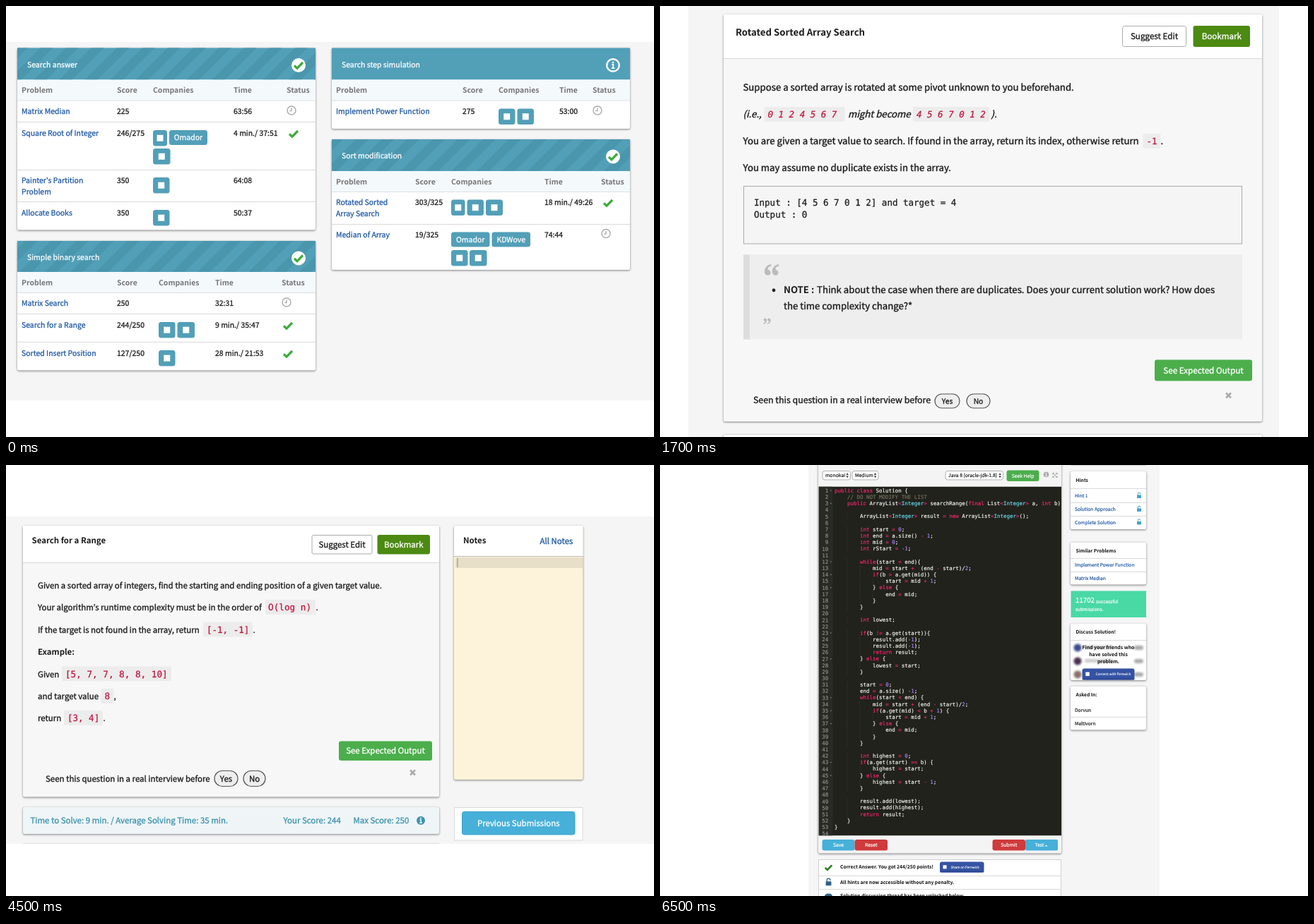
Recreate the animation shown at these times as an HTML page. Size 917 by 611 pixels, loop 8 s.

```html
<!DOCTYPE html>
<html lang="en">
<head>
<meta charset="utf-8">
<title>Practice problems</title>
<style>
html, body { margin: 0; width: 100%; height: 100%; overflow: hidden; background: #fff; }
#stage { position: relative; width: 917px; height: 611px; overflow: hidden; }
#strip { animation: cut 8s step-end infinite; }
#strip > svg { display: block; width: 917px; height: 611px; overflow: hidden; background: #fff; }
@keyframes cut {
  0% { transform: translateY(0); }
  6.25% { transform: translateY(-611px); }
  31.25% { transform: translateY(-1222px); }
  56.25% { transform: translateY(-1833px); }
  81.25%, 100% { transform: translateY(-2444px); }
}
text {
  font-family: "Noto Sans CJK JP", "Noto Sans CJK SC", "Noto Sans CJK", Lato, sans-serif;
  white-space: pre; text-rendering: geometricPrecision; stroke-width: .028em;
}
.b { font-weight: 700; stroke: none; }
.i { font-style: italic; }
.mid { text-anchor: middle; }
.end { text-anchor: end; }
.mono { font-family: "DejaVu Sans Mono", "Liberation Mono", monospace; stroke-width: .02em; }
.quote { font-family: "Noto Serif", serif; font-weight: 700; }
.card { filter: drop-shadow(0 1px 1.5px rgba(0, 0, 0, .4)) drop-shadow(0 0 .5px rgba(0, 0, 0, .25)); }
.blur { filter: blur(1.5px); }
</style>
</head>
<body>
<div id="stage"><div id="strip"></div></div>
<script>
const TEAL = '#529fb8', GRAY = '#f5f5f5', LINK = '#1f58a5', INK = '#1c1c1c',
      GREEN = '#4bae4b', RED = '#cf3a3c', SKY = '#47b0d8', RULE = '#d9d9d9',
      OLIVE = '#4c8a12', CODE = '#c0163f', CHIP = '#ececec';

const esc = s => s.replace(/&/g, '&amp;').replace(/</g, '&lt;');
const ink = c => `fill="${c}" stroke="${c}"`;
const rect = (x, y, w, h, fill, more = '') =>
  `<rect x="${x}" y="${y}" width="${w}" height="${h}" fill="${fill}" ${more}/>`;
const line = (x1, y, x2, color = RULE) =>
  `<path d="M${x1} ${y}H${x2}" stroke="${color}"/>`;
// cy is the middle of the capitals
const text = (x, cy, s, size, fill = INK, cls = '') =>
  `<text x="${x}" y="${(cy + size * .36).toFixed(2)}" font-size="${size}" ${ink(fill)} class="${cls}">${esc(s)}</text>`;
const mono = (x, cy, s, size, fill = INK, cls = '') => text(x, cy, s, size, fill, 'mono ' + cls);
const card = (x, y, w, h, fill = '#fff') => rect(x, y, w, h, fill, 'rx="2" class="card"');
const button = (x, y, w, h, label, size, fill, color = '#fff', more = 'rx="3"') =>
  rect(x, y, w, h, fill, more) + text(x + w / 2, y + h / 2, label, size, color, 'mid');
const pill = (x, y, w, h, label, size) =>
  button(x, y, w, h, label, size, '#eee', INK, `rx="${h / 2}" stroke="#555" stroke-width="1.2"`);
const chip = (x, y, w, h, tx, s, size, cls) =>
  rect(x, y, w, h, CHIP, 'rx="2"') + mono(tx, y + h / 2, s, size, CODE, cls);
const at = (x, y, k, body) => `<g transform="translate(${x} ${y}) scale(${k})">${body}</g>`;

const check = (x, y, k = 1, color = '#3eab3e') =>
  at(x, y, k, `<path d="M-6 .5L-2 4.3L6 -4" fill="none" stroke="${color}" stroke-width="3.3"/>`);
const clock = (x, y) =>
  at(x, y, 1, '<g fill="none" stroke="#aaa" stroke-width="1.4"><circle r="6"/><path d="M0 -3.6V.6H-2.8"/></g>');
const cross = (x, y) =>
  at(x, y, 1, '<path d="M-3.5 -3.5L3.5 3.5M3.5 -3.5L-3.5 3.5" stroke="#aaa" stroke-width="2.6"/>');
const info = (x, y, r, fill, mark) =>
  at(x, y, r / 7, `<circle r="7" fill="${fill}"/><path d="M-1.8 -1H.3V3.8M-2 3.8H2.2" fill="none" stroke="${mark}" stroke-width="1.6"/><circle cx="0" cy="-3.7" r="1.2" fill="${mark}"/>`);
const lock = (x, y, k, color) =>
  at(x, y, k, `<rect x="-6" y="-1" width="12" height="9" rx="1" fill="${color}"/><path d="M-3.5 0V-4A3.5 3.5 0 0 1 3.5 -4V-3" fill="none" stroke="${color}" stroke-width="2"/>`);
const expand = (x, y, k) =>
  at(x, y, k, '<path d="M-4 -4L4 4M4 -4L-4 4" stroke="#aaa" stroke-width="1.6"/><path d="M-6 -6h5l-5 5zM6 -6v5l-5 -5zM-6 6v-5l5 5zM6 6h-5l5 -5z" fill="#aaa"/>');
const select = (x, y, w, h, label, size) =>
  rect(x, y, w, h, '#fff', 'rx="3" stroke="#aaa" stroke-width=".9"') +
  text(x + size * .6, y + h / 2, label, size) +
  at(x + w - size * .65, y + h / 2, size / 10, '<path d="M-2.6 -1.2L0 -5L2.6 -1.2zM-2.6 1.2L0 5L2.6 1.2z" fill="#333"/>');

// ---- problem tables
const badge = (x, y, w, label) =>
  rect(x, y, w, label ? 21 : 22.5, TEAL, 'rx="3.5"') +
  (label ? text(x + w / 2, y + 10.5, label, 10.5, '#fff', 'mid')
         : rect(x + w / 2 - 4.5, y + 6.75, 9, 9, '#fff'));

function table(x, y, h, head, title, done, cols, seps, rows) {
  const w = 422, f = 10.48, top = y + head;
  let s = card(x, y, w, h) + rect(x, y, w, head, TEAL);
  if (done) s += rect(x, y, w, head, 'url(#stripes)');
  s += text(x + 14, y + 23.5, title, f, '#fff') + `<circle cx="${x + 398}" cy="${y + 24.5}" r="10" fill="#fff"/>`;
  s += done ? check(x + 398, y + 24.5) : info(x + 398, y + 24.5, 7.6, TEAL, '#fff');
  s += rect(x, top, w, 29, '#f4f9fb') + line(x, top + 29.5, x + w, '#dcdfe2');
  ['Problem', 'Score', 'Companies', 'Time', 'Status'].forEach((c, i) =>
    s += text(cols[i], top + 15, c, f, '#777', 'b'));
  seps.forEach(v => s += line(x, v, x + w));
  rows.forEach(([cy, name, score, time, ok, sx, sy]) => {
    name.split('|').forEach((n, i) => s += text(cols[0], cy + i * 16.5, n, f, LINK));
    s += text(cols[1], cy, score, f) + text(cols[3], cy, time, f);
    if (sx) s += ok ? check(sx, sy) : clock(sx, sy);
  });
  return s;
}

const tables =
  `<defs><pattern id="stripes" width="36" height="36" patternUnits="userSpaceOnUse" patternTransform="skewX(-45)"><rect width="18" height="36" fill="#4a96ad"/></pattern></defs>` +
  rect(0, 51, 917, 508, GRAY) +
  table(16, 59.5, 258, 45, 'Search answer', 1, [22, 157, 208, 322, 397], [164.5, 232.5, 277.5], [
    [149, 'Matrix Median', '225', '63:56', 0, 404, 148],
    [180, 'Square Root of Integer', '246/275', '4 min./ 37:51', 1, 407, 181],
    [247, "Painter's Partition|Problem", '350', '64:08'],
    [293, 'Allocate Books', '350', '50:37']]) +
  table(16, 333, 183.5, 44, 'Simple binary search', 1, [22, 157, 216, 296, 390], [436.5, 476.5], [
    [421, 'Matrix Search', '250', '32:31', 0, 397, 420],
    [452, 'Search for a Range', '244/250', '9 min./ 35:47', 1, 399, 453],
    [492, 'Sorted Insert Position', '127/250', '28 min./ 21:53', 1, 399, 493]]) +
  table(461, 59.5, 114.5, 45, 'Search step simulation', 0, [467, 646, 697, 783, 830], [], [
    [149, 'Implement Power Function', '275', '53:00', 0, 837, 148]]) +
  table(461, 189, 185, 45, 'Sort modification', 1, [467, 579, 630, 762, 842], [309.5], [
    [278, 'Rotated Sorted|Array Search', '303/325', '18 min./ 49:26', 1, 852, 279],
    [324, 'Median of Array', '19/325', '74:44', 0, 849, 322.5]]) +
  [[208, 176, 20], [231, 176, 54, 'Omador'], [208, 202, 24.5], [208, 243, 23.5], [208, 289, 23.5],
   [216, 448, 23.5], [242.5, 448, 24.5], [216, 488, 23.5], [697, 145.5, 23.5], [723.5, 145.5, 23.5],
   [630, 274.5, 19.5], [652.5, 274.5, 23.5], [679, 274.5, 24], [630, 320.5, 54.5, 'Omador'],
   [687.5, 320.5, 54.5, 'KDWove'], [630, 346, 23.5], [656, 346, 24.5]].map(b => badge(...b)).join('');

// ---- first problem statement
const rotated = rect(40, 0, 836, 611, GRAY) + card(90, 12, 762, 577, '#f7f7f7') +
  rect(90, 12, 762, 62, '#fff') + line(90, 74.5, 852) +
  text(107, 37, 'Rotated Sorted Array Search', 13.2, INK, 'b') +
  button(654.5, 28.5, 90, 29, 'Suggest Edit', 11.65, '#fff', INK, 'rx="3" stroke="#aaa"') +
  button(754.5, 28, 80.5, 30, 'Bookmark', 11.6, OLIVE) +
  text(117.5, 115, 'Suppose a sorted array is rotated at some pivot unknown to you beforehand.', 13.2) +
  text(117.5, 153, '(i.e.,', 13.2, INK, 'i') + chip(147.5, 143, 114, 21, 152.5, '0 1 2 4 5 6 7', 12.5, 'i') +
  text(266, 153, 'might become', 13.2, INK, 'i') + chip(358, 143, 108, 21, 363, '4 5 6 7 0 1 2', 12.5, 'i') +
  text(468.5, 153, ').', 13.2, INK, 'i') +
  text(117.5, 191, 'You are given a target value to search. If found in the array, return its index, otherwise return', 13.2) +
  chip(683.5, 181, 25, 21, 688.5, '-1', 12.5) + text(708.5, 191, '.', 13.2) +
  text(117.5, 229, 'You may assume no duplicate exists in the array.', 13.2) +
  rect(118.5, 255.5, 705, 81.5, GRAY, 'stroke="#aaa"') +
  mono(133, 278.5, 'Input : [4 5 6 7 0 1 2] and target = 4', 12.53) + mono(133, 295.5, 'Output : 0', 12.53) +
  rect(118, 352.5, 706, 120, '#eee') + rect(118, 352.5, 9, 120, '#ddd') +
  '<text x="145" y="403" font-size="52" fill="#bbb" class="quote">“</text>' +
  '<text x="145" y="462" font-size="27" fill="#bbb" class="quote">”</text>' +
  '<circle cx="161" cy="403" r="2.4" fill="#222"/>' +
  text(175, 402, 'NOTE :', 13.2, INK, 'b') +
  text(222, 402, 'Think about the case when there are duplicates. Does your current solution work? How does', 13.2) +
  text(175, 425, 'the time complexity change?*', 13.2) +
  button(700, 501.5, 138, 30, 'See Expected Output', 11.63, GREEN) +
  text(132, 559, 'Seen this question in a real interview before', 12.37) +
  pill(389, 550, 35, 20, 'Yes', 10.3) + pill(434, 550, 33, 20, 'No', 10.3) + cross(804.5, 552) +
  card(90, 607.5, 762, 40);

// ---- code editor
const TOKEN = /\/\/.*|\b(?:public|class|while|if|else|return|new|final|int)\b|\bInteger\b|-?\b\d+|&&|[=!<>]=|[=<>+-]/g;
const hue = k => k.startsWith('//') ? '#75715e' : k === 'Integer' ? '#66d9ef' : /\d/.test(k) ? '#ae81ff' : '#f92672';
function paint(s) {
  let out = '', last = 0;
  for (const m of s.matchAll(TOKEN)) {
    out += esc(s.slice(last, m.index)) + `<tspan ${ink(hue(m[0]))}>${esc(m[0])}</tspan>`;
    last = m.index + m[0].length;
  }
  return out + esc(s.slice(last));
}

// col and row: where column 0 and the middle of line 1 stand; step: line height
function editor(x, y, w, h, col, row, adv, step, code, active) {
  const size = adv / .602, lines = code.split('\n');
  let s = rect(0, 0, w, h, '#21221c') + rect(0, 0, col - x - adv * .6, h, '#282a23');
  if (active) s += rect(0, row - y + (active - 1.5) * step, w, step, '#191a18');
  lines.forEach((l, i) => {
    const cy = row - y + i * step, cx = col - x, pad = l.search(/\S|$/);
    for (let c = 4; c < pad; c += 4)
      s += `<path d="M${cx + c * adv} ${cy - step / 2}v${step}" stroke="#45463e" stroke-width=".6" stroke-dasharray="1 1"/>`;
    s += mono(cx - adv * 1.95, cy, String(i + 1), size, '#8f908a', 'end');
    if (l.endsWith('{')) s += at(cx - adv * 1.15, cy, adv / 6.57, '<path d="M-2 -1h4l-2 2.6z" fill="#777"/>');
    if (pad < l.length)
      s += `<text class="mono" x="${cx + pad * adv}" y="${cy + size * .33}" font-size="${size}" ${ink('#f8f8f2')}>${paint(l.slice(pad))}</text>`;
  });
  return `<svg x="${x}" y="${y}" width="${w}" height="${h}">${s}</svg>`;
}

const share = (x, y, w, h, label, size, lx) =>
  rect(x, y, w, h, '#3553a3', 'rx="3"') + rect(x, y + h - 2, w, 2, '#2b4590', 'rx="1"') +
  rect(x + h * .3, y + h * .32, h * .34, h * .34, '#fff') + text(lx, y + h / 2, label, size, '#fff');

const searchCode = `public class Solution {
    // DO NOT MODIFY THE LIST
    public int search(final List<Integer> a, int b) {

        int start = 0;
        int end = a.size() - 1;
        while(start <= end){
            int mid = start + ((end - start) /2);
            if(a.get(mid) == b) {
                return mid;
            }
            if(a.get(start) <= a.get(mid)) {
                if(a.get(start) <= b && b < a.get(mid)) {
                    end = mid - 1;
                }
                else {
                    start = mid + 1;
                }
            }
            else{
                if (a.get(mid) < b && b <= a.get(end)) {
                    start = mid + 1;
                }
                else {
                    end = mid - 1;
                }
            }
        }
        return -1;
    }
}
`;

const rangeCode = `public class Solution {
    // DO NOT MODIFY THE LIST
    public ArrayList<Integer> searchRange(final List<Integer> a, int b) {

        ArrayList<Integer> result = new ArrayList<Integer>();

        int start = 0;
        int end = a.size() - 1;
        int mid = 0;
        int rStart = -1;

        while(start < end){
            mid = start +  (end - start)/2;
            if(b > a.get(mid)) {
                start = mid + 1;
            } else {
                end = mid;
            }
        }

        int lowest;

        if(b != a.get(start)){
            result.add(-1);
            result.add(-1);
            return result;
        } else {
            lowest = start;
        }

        start = 0;
        end = a.size() -1;
        while(start < end) {
            mid = start + (end - start)/2;
            if(a.get(mid) < b + 1) {
                start = mid + 1;
            } else {
                end = mid;
            }
        }

        int highest = 0;
        if(a.get(start) == b) {
            highest = start;
        } else {
            highest = start - 1;
        }

        result.add(lowest);
        result.add(highest);
        return result;
    }
}
`;

const searchEditor = rect(127, 0, 662, 611, GRAY) + card(134, -10, 644, 534, '#f4f4f4') +
  select(145, 4.5, 60, 25.5, 'monokai', 10.1) + select(208, 4.5, 56.5, 25.5, 'Medium', 10.1) +
  select(504, 4.5, 120, 25.5, 'Java 8 (oracle-jdk-1.8)', 9.9) +
  button(633, 4, 86.5, 25, 'Seek Help', 9.9, GREEN) + info(737, 13, 6.8, '#aaa', '#fff') + expand(760, 14, 1) +
  editor(134, 48, 643, 435, 176, 55.3, 6.566, 13.65, searchCode, 7) +
  rect(307.3, 130.5, 1, 13, '#f8f8f0', 'opacity=".4"') +
  button(145, 492, 85, 25, 'Save', 10, SKY) + button(230, 492, 86, 25, 'Reset', 10, RED) +
  button(595, 492, 85, 25, 'Submit', 10, RED) + rect(680, 492, 86.5, 25, SKY, 'rx="3"') +
  text(709.5, 504.5, 'Test', 10, '#fff') + '<path d="M731 507h6l-3 -3z" fill="#fff"/>' +
  rect(134, 540.5, 643, 90, '#fff', 'stroke="#d0d0d0"') + line(134, 584.5, 777) +
  check(161, 563, 1.25, '#2c7d22') + text(192, 562, 'Correct Answer. You got 303/325 points!', 10.55, '#111', 'b') +
  share(414.5, 548, 115.5, 27.5, 'Share on Fernwick', 8.7, 443) +
  lock(161, 601, 1.1, '#2f6186') + text(192, 602, 'All hints are now accessible without any penalty.', 10.55, '#111', 'b');

// ---- second problem statement
const F = 11.46;
const range = rect(0, 73, 917, 464, GRAY) + card(24, 86, 589, 384.5, '#f7f7f7') +
  rect(24, 86, 589, 52, '#fff') + line(24, 138.5, 613) +
  text(36.5, 107, 'Search for a Range', F, INK, 'b') +
  button(433, 99.5, 85, 26.5, 'Suggest Edit', F, '#fff', INK, 'rx="2" stroke="#aaa"') +
  button(525.5, 99, 74.5, 27.5, 'Bookmark', F, OLIVE) +
  text(45, 171, 'Given a sorted array of integers, find the starting and ending position of a given target value.', F) +
  text(45, 202, 'Your algorithm’s runtime complexity must be in the order of', F) +
  chip(367, 191, 71, 21, 371, 'O(log n)', 12.7) + text(438.5, 202, '.', F) +
  text(45, 233.5, 'If the target is not found in the array, return', F) +
  chip(279, 222.5, 70, 21, 284, '[-1, -1]', 12.5) + text(349.5, 233.5, '.', F) +
  text(45, 265, 'Example:', F, INK, 'b') +
  text(45, 296.5, 'Given', F) + chip(79, 285.5, 155, 21, 84, '[5, 7, 7, 8, 8, 10]', 12.65) +
  text(45, 328, 'and target value', F) + chip(134.5, 317, 18, 21, 139.5, '8', 12.65) + text(152.5, 328, ',', F) +
  text(45, 359, 'return', F) + chip(82, 348, 55, 21, 87, '[3, 4]', 12.5) + text(137.5, 359, '.', F) +
  button(471, 391.5, 132, 27.5, 'See Expected Output', F, GREEN) + cross(575.5, 436) +
  text(56, 444.5, 'Seen this question in a real interview before', F) +
  pill(295, 433.5, 33, 22, 'Yes', F) + pill(336, 433.5, 31, 22, 'No', F) +
  card(24, 485, 589, 38, '#eff5f7') +
  text(34.5, 503.5, 'Time to Solve: 9 min. / Average Solving Time: 35 min.', F, '#3f93b0') +
  text(392.5, 503.5, 'Your Score: 244', F, '#3f93b0') + text(491.5, 503.5, 'Max Score: 250', F, '#3f93b0') +
  info(587, 504, 6, '#3f93b0', '#fff') + line(24, 536.5, 613, '#ddd') +
  card(634, 86, 182.5, 360, '#fcf3da') + rect(634, 86, 182.5, 43, '#fff') + line(634, 129.5, 816.5, '#bbb') +
  text(647, 107, 'Notes', F, INK, 'b') + text(755.5, 108, 'All Notes', F, LINK) +
  rect(636, 131, 180, 15, '#e8dfc8') + rect(638.5, 132, 1, 13, '#888') +
  rect(634.5, 485.5, 181.5, 46.5, '#fff', 'stroke="#d8d8d8"') +
  button(645.5, 491.5, 159.5, 32.5, 'Previous Submissions', F, SKY, '#fff', 'rx="3" stroke="#3fa5cd"');

// ---- second editor with sidebar
const side = (y, h, title, ty, seps) => card(581, y, 107, h) +
  text(588.5, ty, title, 6.7, '#111', 'b') + seps.map(v => line(581, v, 688)).join('');
const row = (cy, s, color = LINK) => text(587, cy, s, 6.68, color);

const rangeEditor = rect(210, 0, 497, 611, GRAY) + card(224, -10, 344, 560.5, '#f4f4f4') +
  select(230, 8.5, 39.5, 12.5, 'monokai', 6.8) + select(272, 8.5, 37, 12.5, 'Medium', 6.8) +
  select(404, 8.5, 81.5, 12.5, 'Java 8 (oracle-jdk-1.8)', 6.75) +
  button(490.5, 7.5, 46, 15.5, 'Seek Help', 6.8, GREEN) + info(546.5, 13.5, 3.8, '#aaa', '#fff') + expand(559, 14.5, .6) +
  editor(224.5, 30.5, 343.5, 495, 247, 36.2, 4.51, 9.18, rangeCode) +
  button(229.5, 531, 46, 15.5, 'Save', 6.8, SKY) + button(275.5, 531, 46.5, 15.5, 'Reset', 6.8, RED) +
  button(470.5, 531, 46.5, 15.5, 'Submit', 6.8, RED) + rect(517, 531, 46, 15.5, SKY, 'rx="2"') +
  text(530.5, 539, 'Test', 6.8, '#fff') + '<path d="M544.5 540.5h4l-2 -2z" fill="#fff"/>' +
  rect(224.5, 559.5, 343, 70, '#fff', 'stroke="#d0d0d0"') + line(224, 582.5, 568) + line(224, 601.5, 568) +
  check(238.5, 570.5, .8, '#2c7d22') + text(255, 570, 'Correct Answer. You got 244/250 points!', 6.77, '#111', 'b') +
  share(396, 562.5, 62.5, 15, 'Share on Fernwick', 4.7, 411.5) +
  lock(238.5, 591, .65, '#2f6186') + text(255, 592, 'All hints are now accessible without any penalty.', 6.77, '#111', 'b') +
  '<ellipse cx="238.5" cy="611" rx="5.5" ry="3.5" fill="#2f6186"/>' +
  text(255, 610.5, 'Solution discussion thread has been unlocked below.', 6.77, '#111', 'b') +
  line(581, .5, 688, '#ccc') +
  side(9, 82, 'Hints', 22, [33.5, 53.5, 72.5]) + row(44, 'Hint 1') + row(63, 'Solution Approach') + row(81.5, 'Complete Solution') +
  [43, 62, 80.5].map(y => lock(678, y, .5, '#49a3c7')).join('') +
  side(109.5, 60, 'Similar Problems', 121.5, [132.5, 151.5]) + row(141.5, 'Implement Power Function') + row(160.5, 'Matrix Median') +
  rect(581.5, 178.5, 106.5, 37.5, '#49d9a5') + text(588, 192, '11702', 9.7, '#fff') +
  text(617, 193.5, 'successful', 6.55, '#fff') + text(588, 205, 'submissions.', 6.55, '#fff') +
  side(225, 80, 'Discuss Solution!', 237, [248.5]) +
  [[259, '#3d4b8c'], [278, '#4a3050'], [297, '#8a6f6a']].map(([y, c]) =>
    `<g class="blur"><circle cx="591" cy="${y}" r="5.5" fill="${c}"/><rect x="671" y="${y - 3}" width="13" height="6" rx="3" fill="#aaa"/><rect x="601" y="${y - 3}" width="40" height="5" fill="#ccc"/></g>`).join('') +
  ['Find your friends who', 'have solved this', 'problem.'].map((s, i) =>
    text(634.5, 259 + i * 10, s, 6.9, '#111', 'b mid')).join('') +
  share(597.5, 288.5, 74, 16, 'Connect with Fernwick', 4.7, 616.5) +
  side(313.5, 62, 'Asked In:', 326, [357.5]) + row(348, 'Dorvun', INK) + row(366.5, 'Meltivorn', INK);

document.getElementById('strip').innerHTML = [tables, rotated, searchEditor, range, rangeEditor]
  .map(s => `<svg viewBox="0 0 917 611">${s}</svg>`).join('');
</script>
</body>
</html>
```
